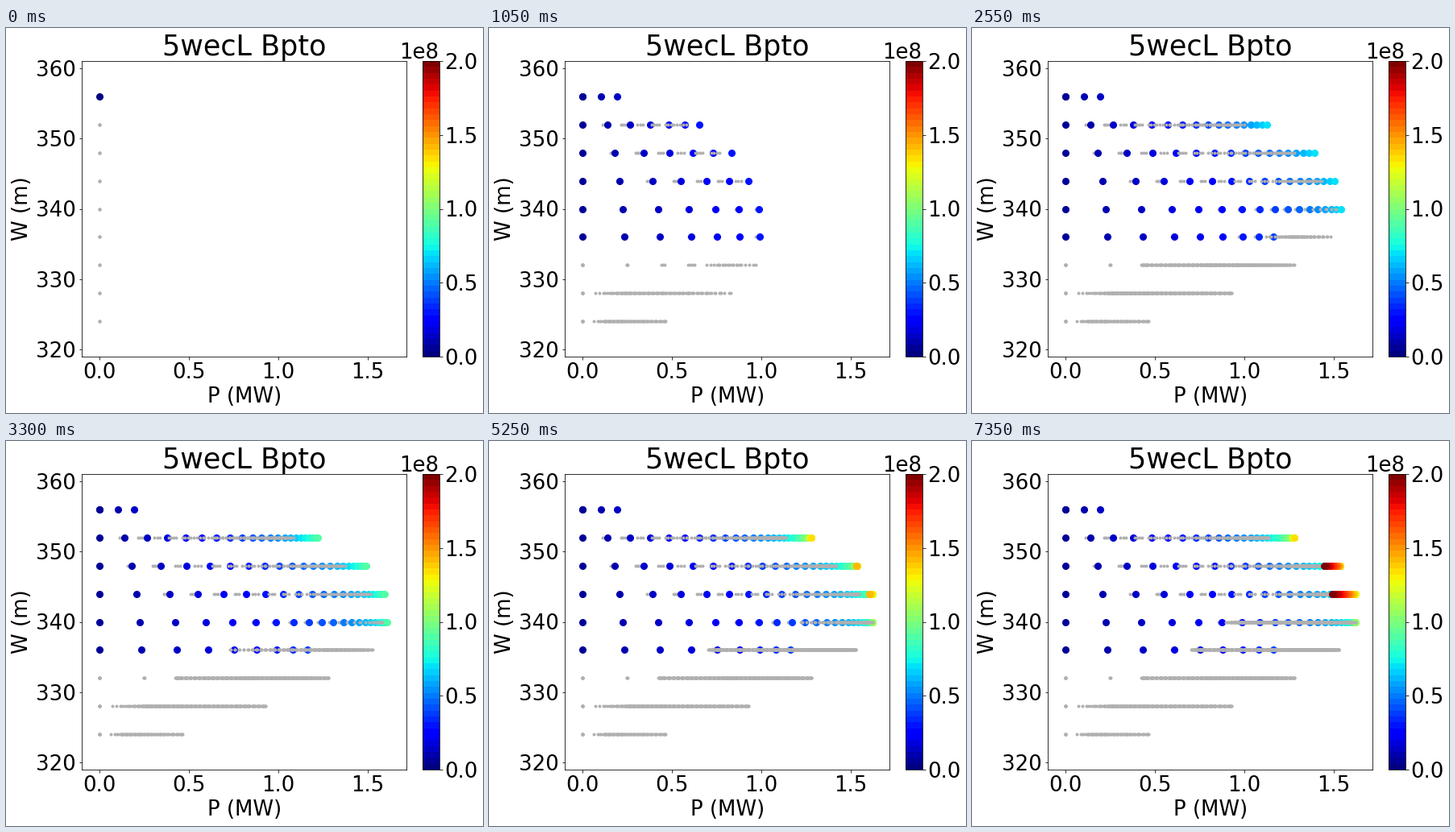
Animation of 592 by 478 pixels, one loop 7500 ms. Source, as a matplotlib script:

```python
import numpy as np
import matplotlib.pyplot as plt
from matplotlib.animation import FuncAnimation
from matplotlib.cm import ScalarMappable
from matplotlib.colors import Normalize

W_PX, H_PX, DPI = 592, 478, 72
N = 50
TEXT, TITLE = 26, 35
GREY = "#b0b0b0"

# One entry per width: peak power, last step on the front, last step with options
WIDTHS = range(324, 357, 4)
PEAK = [0.465, 0.93, 1.28, 1.53, 1.625, 1.625, 1.54, 1.28, 0.925]
FRONT_END = [-10, -10, 1, 9, 26, 49, 49, 33, 3]
OPTION_END = [7, 14, 21, 35, 49, 49, 49, 33, 0]

plt.rcParams.update({"font.family": "DejaVu Sans", "font.size": TEXT})


def best_power(k, width, peak):
    """Absorbed power against damping: a steep rise, then a slow fall."""
    t = max(k - 1, 0) / np.interp(width, [324, 336, 352], [6, 22.5, 32])
    return peak * 3.7 * t / (1 + 1.7 * t + t * t)


def options(k, width, best, front_end):
    """Weaker layouts, spreading out once the width has left the front."""
    above = max(width - 340, 0)
    depth = min(0.7, 0.5 + 0.035 * (336 - width))
    opening = np.clip((k - front_end) / 12, 0, 1) ** 2
    high = best * (0.985 - 0.008 * above)
    low = best * (0.98 - 0.0145 * above - max(depth, 0) * opening)
    return np.linspace(high, low, round((high - low) / 0.026) + 2)


def step_points(k):
    grey, front = [], []
    for width, peak, front_end, option_end in zip(
            WIDTHS, PEAK, FRONT_END, OPTION_END):
        best = best_power(k, width, peak)
        on_front = width >= 336 and k <= front_end and (k > 0 or width == 356)
        if on_front:
            front.append((best, width))
        if k <= option_end:
            grey += [(p, width) for p in options(k, width, best, front_end)]
            if not on_front:
                grey.append((best, width))
    return grey, front


def box(left, top, right, bottom):
    return fig.add_axes([left / W_PX, 1 - bottom / H_PX,
                         (right - left) / W_PX, (bottom - top) / H_PX])


def dots(points, color, size):
    x, y = zip(*points)
    return ax.plot(x, y, "o", color=color, ms=size)[0]


fig = plt.figure(figsize=(W_PX / DPI, H_PX / DPI), dpi=DPI, facecolor="white")
ax = box(94, 41, 497.3, 408)
ax.set(xlim=(-0.1, 1.72), ylim=(319, 361),
       xticks=[0, 0.5, 1, 1.5], yticks=range(320, 361, 10),
       xlabel="P (MW)", ylabel="W (m)")
ax.set_title("5wecL Bpto", fontsize=TITLE)

cmap = plt.get_cmap("jet", N)
cax = box(517.4, 41, 537.5, 408)
bar = fig.colorbar(ScalarMappable(Normalize(0, 2), cmap), cax=cax)
bar.set_ticks([0, 0.5, 1, 1.5, 2],
              labels=["0.0", "0.5", "1.0", "1.5", "2.0"])
fig.text(537.5 / W_PX, 1 - 38 / H_PX, "1e8", ha="right", va="baseline")

steps = []
for k in range(N):
    grey, front = step_points(k)
    steps.append((dots(grey, GREY, 3), dots(front, cmap(k / (N - 1)), 8)))


def update(frame):
    for k, layers in enumerate(steps):
        for layer in layers:
            layer.set_visible(k <= frame)
    return [layer for layers in steps for layer in layers]


anim = FuncAnimation(fig, update, frames=N, interval=150, repeat=True,
                     repeat_delay=0)
plt.show()
```
